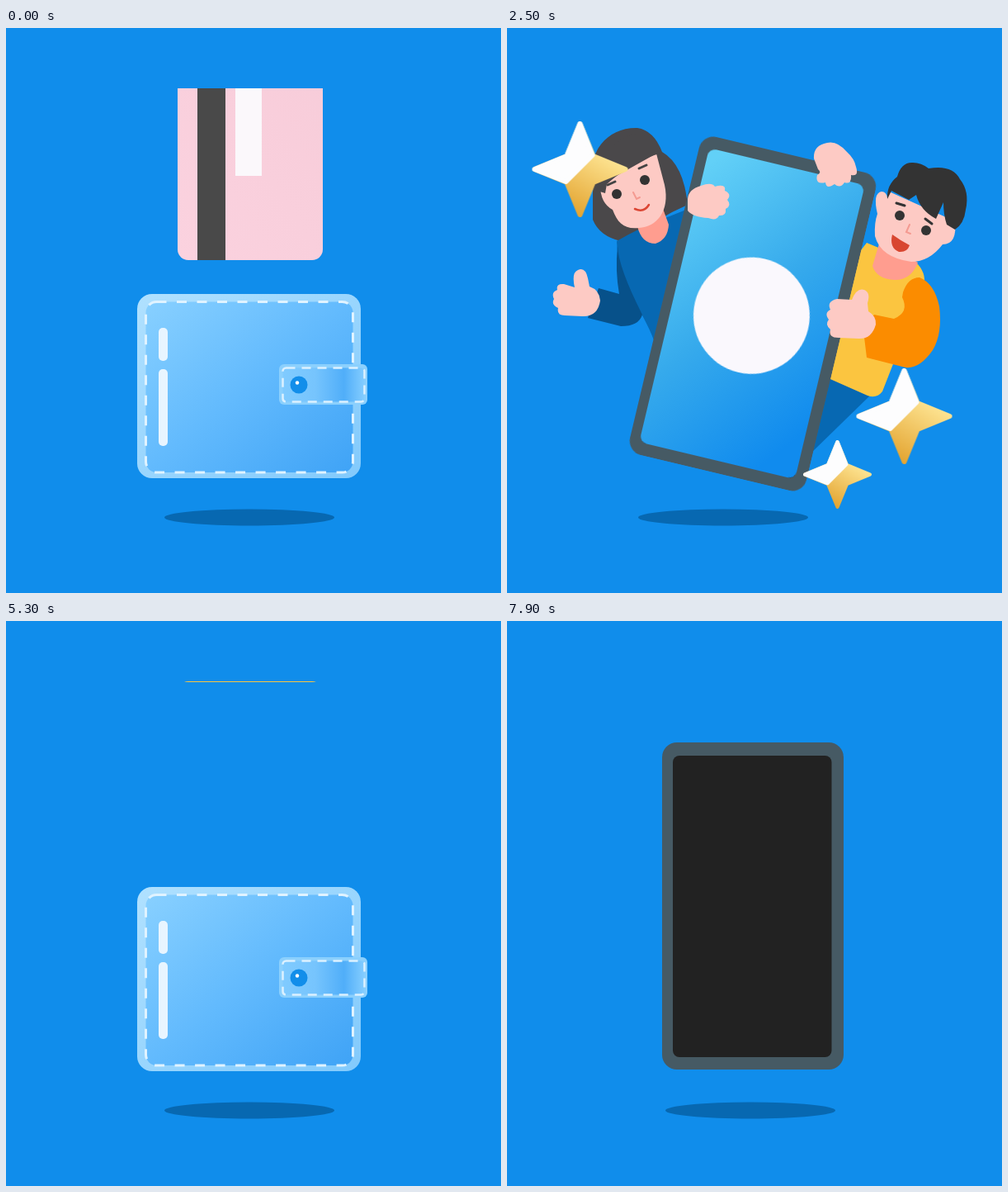
Recreate the animation shown at these times as an HTML page. Size 600 by 684 pixels, loop 8000 ms.

```html
<!DOCTYPE html>
<html lang="en">
<head>
<meta charset="utf-8">
<title>Wallet to phone</title>
<style>
html, body { margin: 0; width: 100%; height: 100%; overflow: hidden; background: #108deb; }
svg { display: block; width: 600px; height: 684px; }

/* One story cycle lasts 6.5 s; the script sets its time. */
.a { animation: 6.5s linear infinite paused; }
#shadow { animation-name: shadow; transform-origin: 295px 592.5px; }
#wallet { animation-name: wallet; transform-origin: 294.5px 434px; }
.card { animation-name: card; }
#yellow { animation-delay: -1.23s; }
#pink { animation-delay: -.5s; }
#phone { animation-name: phone; transform-origin: 298px 345px; }
#screen { animation-name: screen; }
#disc { animation-name: disc; transform-origin: 297px 347.5px; }
.pal { animation-name: pal; transform-origin: 298px 345px; }
.star { animation-name: star; transform-box: fill-box; transform-origin: center; }

@keyframes shadow {
  0%, 22.5% { transform: translate(0, 0) scale(1); }
  29.23%, 55.38% { transform: translate(-33px, 0) scale(1); }
  61.54%, 65.38% { transform: translate(4px, 0) scale(.767, 1); }
  70.77%, 73.85% { transform: translate(4px, 0) scale(0); }
  77.69% { transform: translate(0, 0) scale(1.04); }
  80%, 100% { transform: translate(0, 0) scale(1); }
}
@keyframes wallet {
  0%, 4% { opacity: 1; transform: translate(0, 0) rotate(0deg) scale(1); }
  5.4% { transform: translate(0, 5px) rotate(0deg) scale(1.06, .95); }
  7.4%, 13.08% { transform: translate(0, 0) rotate(0deg) scale(1); animation-timing-function: ease-in; }
  17.69% { opacity: 1; transform: translate(3px, -80px) rotate(-90deg) scale(1); }
  17.7%, 73.84% { opacity: 0; transform: translate(0, 0) rotate(0deg) scale(0); }
  73.85% { opacity: 1; transform: translate(0, 0) rotate(0deg) scale(0); animation-timing-function: ease-out; }
  77.69% { opacity: 1; transform: translate(0, 0) rotate(0deg) scale(1.015); }
  80%, 91.5% { opacity: 1; transform: translate(0, 0) rotate(0deg) scale(1); }
  93% { transform: translate(0, 5px) rotate(0deg) scale(1.06, .95); }
  95%, 100% { opacity: 1; transform: translate(0, 0) rotate(0deg) scale(1); }
}
@keyframes card {
  0% { opacity: 1; transform: translate(0, 0); animation-timing-function: cubic-bezier(.333, 0, .667, .333); }
  12.3% { opacity: 1; transform: translate(0, 530px); }
  12.31%, 100% { opacity: 0; transform: translate(0, 530px); }
}
@keyframes phone {
  0%, 17.69% { opacity: 0; transform: translate(0, 0) rotate(0deg) scale(1, .69); }
  17.7% { opacity: 1; transform: translate(0, 0) rotate(0deg) scale(1, .69); animation-timing-function: ease-out; }
  20% { transform: translate(0, 0) rotate(0deg) scale(1, 1.04); }
  21.54%, 23.08% { transform: translate(0, 0) rotate(0deg) scale(1); animation-timing-function: ease-in-out; }
  29.23% { transform: translate(0, 1px) rotate(16deg) scale(1); animation-timing-function: ease-in-out; }
  32%, 55.38% { transform: translate(0, 1px) rotate(13.4deg) scale(1); animation-timing-function: ease-in-out; }
  60% { transform: translate(0, 0) rotate(0deg) scale(1); animation-timing-function: ease-in-out; }
  63.85%, 65.2% { transform: translate(0, 26px) rotate(0deg) scale(1); animation-timing-function: ease-in; }
  70.6% { opacity: 1; transform: translate(0, -475px) rotate(0deg) scale(1); }
  70.61%, 100% { opacity: 0; transform: translate(0, -475px) rotate(0deg) scale(1); }
}
@keyframes screen {
  0%, 21.6% { opacity: 0; }
  24.6%, 100% { opacity: 1; }
}
@keyframes disc {
  0%, 22.3% { transform: scale(0); animation-timing-function: ease-out; }
  25.8% { transform: scale(1.1); }
  27.7%, 100% { transform: scale(1); }
}
@keyframes pal {
  0%, 24.6% { opacity: 0; transform: scale(.3) rotate(-12deg); }
  24.61% { opacity: 1; transform: scale(.3) rotate(-12deg); animation-timing-function: ease-out; }
  31.5% { opacity: 1; transform: scale(1.02) rotate(2deg); }
  34%, 55.38% { opacity: 1; transform: scale(1) rotate(0deg); animation-timing-function: ease-in; }
  60.5% { opacity: 1; transform: scale(.3) rotate(-12deg); }
  60.51%, 100% { opacity: 0; transform: scale(.3) rotate(-12deg); }
}
@keyframes star {
  0%, 26% { transform: scale(0); animation-timing-function: ease-out; }
  33% { transform: scale(1.08); }
  36%, 41% { transform: scale(1); animation-timing-function: ease-in-out; }
  46% { transform: scale(.86); animation-timing-function: ease-in-out; }
  52%, 55.38% { transform: scale(1); animation-timing-function: ease-in; }
  60%, 100% { transform: scale(0); }
}
</style>
</head>
<body>
<svg viewBox="0 0 600 684">
  <defs>
    <linearGradient id="leather" x1="0" y1="0" x2="1" y2="1">
      <stop offset="0" stop-color="#88d0ff"/><stop offset=".5" stop-color="#62bafd"/><stop offset="1" stop-color="#3fa3f6"/>
    </linearGradient>
    <linearGradient id="rim" x1="0" y1="0" x2="1" y2="1">
      <stop offset="0" stop-color="#b0e1ff"/><stop offset="1" stop-color="#82cafc"/>
    </linearGradient>
    <linearGradient id="strap">
      <stop offset="0" stop-color="#80cbff"/><stop offset=".4" stop-color="#76c4fd"/><stop offset=".75" stop-color="#50aef9"/><stop offset="1" stop-color="#84cdff"/>
    </linearGradient>
    <linearGradient id="glow" x1=".1" y1="0" x2=".75" y2="1">
      <stop offset="0" stop-color="#62d0f7"/><stop offset=".5" stop-color="#36aaec"/><stop offset="1" stop-color="#108bee"/>
    </linearGradient>
    <linearGradient id="gold" x1=".8" y1=".3" x2=".4" y2="1">
      <stop offset="0" stop-color="#ffe898"/><stop offset="1" stop-color="#e3a22d"/>
    </linearGradient>
    <linearGradient id="rose" x1="0" y1="1" x2="1" y2="0">
      <stop offset="0" stop-color="#fbd2df"/><stop offset="1" stop-color="#f7ccd9"/>
    </linearGradient>
    <clipPath id="slot"><rect y="73" width="600" height="462"/></clipPath>
    <clipPath id="under"><rect y="73" width="600" height="611"/></clipPath>
    <g id="spark" stroke-width="6" stroke-linejoin="round">
      <path d="M0-55L16-16 55 0 16 16 0 55-16 16-55 0-16-16Z" fill="url(#gold)" stroke="url(#gold)"/>
      <path d="M0-55L15-17-17 15-55 0-16-16Z" fill="#fdfdfe" stroke="#fdfdfe"/>
    </g>
  </defs>

  <rect width="600" height="684" fill="#108deb"/>
  <ellipse id="shadow" class="a" cx="295" cy="592.5" rx="103" ry="10" fill="#0768b1"/>

  <g clip-path="url(#slot)">
    <g id="yellow" class="a card"><rect x="208" y="-197" width="176" height="270" rx="13" fill="#fbc640"/></g>
    <g id="pink" class="a card">
      <rect x="208" y="-197" width="176" height="270" rx="13" fill="url(#rose)"/>
      <path d="M232-197h34V73h-34z" fill="#494949"/>
      <path d="M278-197h32V-29h-32z" fill="#fbf8fb"/>
    </g>
  </g>

  <g id="wallet" class="a">
    <rect x="159" y="322" width="271" height="223" rx="18" fill="url(#rim)"/>
    <rect x="169.500" y="331.500" width="251" height="206.500" rx="13" fill="url(#leather)" stroke="#e0f3ff" stroke-width="3" stroke-dasharray="12 12.500"/>
    <g fill="#e8f5ff">
      <rect x="185" y="363" width="11" height="40" rx="5"/>
      <rect x="185" y="413" width="11" height="93" rx="5"/>
    </g>
    <rect x="331" y="407" width="107" height="49" rx="6" fill="#8bd0fd"/>
    <rect x="335.500" y="411.500" width="99" height="41" rx="4" fill="url(#strap)" stroke="#dcf1ff" stroke-width="2.500" stroke-dasharray="11 8"/>
    <circle cx="355" cy="432" r="10.500" fill="#128eea"/>
    <circle cx="353" cy="429.500" r="2.200" fill="#fff"/>
  </g>

  <g class="a pal" id="woman">
    <path d="M104 190C96 150 122 120 158 121Q178 124 188 150 214 165 219 214L200 223 138 258Q112 252 104 232Z" fill="#4a484a"/>
    <path d="M133 258Q160 242 192 230L222 218 260 300 210 400 178 378C166 344 134 306 133 258Z" fill="#0768b2"/>
    <path d="M134 264Q135 290 164 347 160 361 138 361L98 351 111 315 136 322Q131 294 134 264Z" fill="#07518a"/>
    <path d="M158 240L188 216 196 238Q195 256 180 261 163 261 158 240Z" fill="#ff9d8f"/>
    <path d="M113 190L181 152 191 190C198 222 181 241 160 242 142 244 134 236 128 220Q113 212 113 190Z" fill="#fdcac4"/>
    <path d="M106 196C104 155 140 125 164 128L188 151Q152 161 121 189L119 200Z" fill="#4a484a"/>
    <circle cx="133" cy="201" r="6" fill="#333"/>
    <circle cx="167" cy="184" r="6" fill="#333"/>
    <g fill="none" stroke-linecap="round">
      <path d="M122 190l9-4M160 170l9-4" stroke="#444" stroke-width="3"/>
      <path d="M153 199l4 8 4-2" stroke="#f49a91" stroke-width="2"/>
      <path d="M155 219q11 5 17-5" stroke="#db4634" stroke-width="2.500"/>
    </g>
    <path d="M82 314Q78 296 86 293 95 289 98 303L100 313Q112 317 113 330 110 350 91 349L70 348Q60 348 62 339 53 335 57 328 53 320 61 317 59 309 69 310Z" fill="#fdcac4"/>
  </g>

  <g class="a pal" id="man">
    <path d="M392 418L440 445 365 518Z" fill="#0768b2"/>
    <path d="M436 260L498 286Q510 300 504 315L455 440Q448 449 437 445L385 422 405 300Z" fill="#fbc540"/>
    <path d="M452 258L498 284Q490 305 470 305 448 304 443 288Z" fill="#ff9d8f"/>
    <path d="M480 320Q486 302 500 302 518 309 524 337 528 370 516 390 500 413 483 411L436 399 432 366 445 347 469 352Q488 344 479 326Z" fill="#fb8c00"/>
    <path d="M463 198L543 234Q546 262 528 262 512 283 490 283 453 278 446 252 445 236 449 225 443 200 454 198Q460 198 461 206Z" fill="#fdcac4"/>
    <path d="M461 207Q460 190 473 180 478 162 492 163 502 163 511 170 540 165 549 183 561 198 556 220 554 237 543 244L533 238Q529 226 529 211L520 231Q501 221 496 202L487 208 466 197Z" fill="#333"/>
    <circle cx="476" cy="227" r="6" fill="#333"/>
    <circle cx="508" cy="245" r="6" fill="#333"/>
    <g fill="none" stroke-linecap="round">
      <path d="M472 212l10 3M507 231l8 6" stroke="#333" stroke-width="3"/>
      <path d="M488 238l-4 9 5 2" stroke="#f49a91" stroke-width="2"/>
    </g>
    <path d="M467 250Q478 258 488 263 485 272 475 271 463 266 467 250Z" fill="#d84630"/>
  </g>

  <g clip-path="url(#under)">
    <g id="phone" class="a">
      <rect x="188" y="147" width="220" height="396" rx="18" fill="#465a64"/>
      <rect x="201" y="163" width="192.500" height="365" rx="8" fill="#222"/>
      <g id="screen" class="a">
        <rect x="200" y="162" width="194" height="366" rx="9" fill="url(#glow)"/>
        <circle id="disc" class="a" cx="297" cy="347.500" r="70.500" fill="#faf8fd"/>
      </g>
    </g>
  </g>

  <g class="a pal" fill="#fdcac4">
    <path d="M219 207Q220 195 235 191 248 186 252 192 266 188 264 197 273 201 267 208 273 215 265 219 266 228 257 227 254 234 244 230 225 229 219 221Z"/>
    <path d="M372 158Q371 142 388 139 400 136 412 150 421 158 423 168 427 180 417 178 418 190 409 187 404 195 397 189 387 196 386 187 373 190 376 178 382 175 377 171Z"/>
    <path d="M418 329Q424 314 433 317 441 320 437 333L438 343Q448 349 447 359 442 377 426 376L402 375Q389 375 392 365 385 359 390 353 384 345 392 341 387 331 400 328Z"/>
  </g>

  <g transform="translate(88.500 171)"><g class="a star"><use href="#spark"/></g></g>
  <g transform="translate(481.500 470)"><g class="a star"><use href="#spark"/></g></g>
  <g transform="translate(400.500 540.500) scale(.715)"><g class="a star"><use href="#spark"/></g></g>
</svg>
<script>
const LOOP = 8000, CYCLE = 6500;
const parts = document.getAnimations();
const start = performance.now();

function draw() {
  const t = (performance.now() - start) % LOOP % CYCLE;
  for (const p of parts) p.currentTime = t;
  requestAnimationFrame(draw);
}
draw();
</script>
</body>
</html>
```
